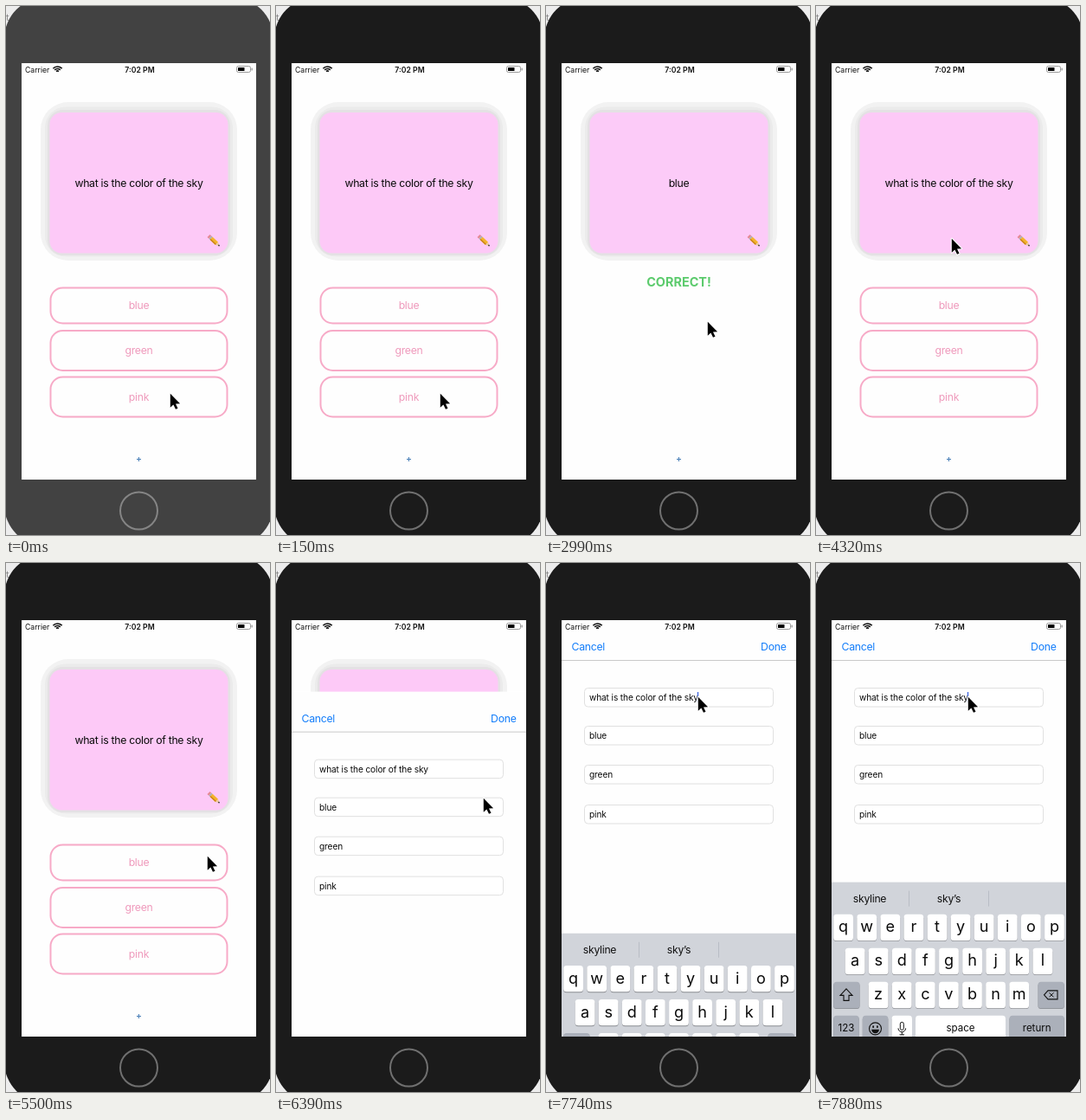
An HTML page with a canvas for the animation above (8 s loop, 305 by 611 pixels).

```html
<!DOCTYPE html>
<html lang="en">
<head>
<meta charset="utf-8">
<title>Flashcards</title>
<style>
html, body { margin: 0; width: 100%; height: 100%; overflow: hidden; background: #eee; }
canvas { display: block; width: 305px; height: 611px; }
</style>
</head>
<body>
<canvas id="stage"></canvas>
<script>
const W = 305, H = 611, LOOP = 8000;
const SCREEN = { x: 18, y: 66, w: 271, h: 481 };
const PT = SCREEN.w / 375;
const BLUE = '#137dfa', PINK = '#ef9abc';
const QUESTION = 'what is the color of the sky';

const canvas = document.getElementById('stage');
const ctx = canvas.getContext('2d');
const dpr = window.devicePixelRatio || 1;
canvas.width = W * dpr;
canvas.height = H * dpr;

// Pointer stops: time, x, y
const POINTER = [
  [0, 189, 447], [600, 189, 436], [750, 189, 415], [900, 189, 402],
  [1650, 188, 388], [1800, 186, 372], [1950, 186, 367],
  [2990, 186, 364], [3140, 183, 355], [3290, 182, 350],
  [3590, 175, 318], [3740, 164, 280], [3890, 157, 260],
  [4320, 156, 268], [4470, 173, 316],
  [4760, 170, 390], [4910, 163, 475], [5060, 159, 519], [5200, 167, 490],
  [5350, 203, 405], [5500, 232, 338], [5650, 242, 293], [5800, 244, 277],
  [5950, 239, 271], [6690, 212, 222], [6840, 199, 201],
  [7140, 184, 172], [7290, 175, 154]
];

const stepFrom = (t, start, step) => start + Math.floor((t - start) / step) * step;

// Remaining fraction of a critically damped slide
function spring(ms) {
  const a = Math.max(0, ms) * 0.01826;
  return (1 + a) * Math.exp(-a);
}

function box(x, y, w, h, r, fill, stroke, line = 1) {
  ctx.beginPath();
  ctx.roundRect(x, y, w, h, r);
  if (fill) { ctx.fillStyle = fill; ctx.fill(); }
  if (stroke) { ctx.strokeStyle = stroke; ctx.lineWidth = line; ctx.stroke(); }
}

function path(points, color, width = 1, closed = false) {
  ctx.beginPath();
  points.forEach(([x, y]) => ctx.lineTo(x, y));
  if (closed) ctx.closePath();
  ctx.strokeStyle = color;
  ctx.lineWidth = width;
  ctx.stroke();
}

function text(str, x, y, pt, color, { align = 'center', weight = 400, track = 0 } = {}) {
  ctx.font = `${weight} ${pt * PT}px Inter, Roboto, sans-serif`;
  ctx.letterSpacing = `${track * PT}px`;
  ctx.textAlign = align;
  ctx.fillStyle = color;
  ctx.fillText(str, x, y);
}

const body = (str, x, y, color, align) => text(str, x, y, 17, color, { align, track: -0.41 });

function drawDevice(active) {
  ctx.fillStyle = '#ededed';
  ctx.fillRect(0, 0, W, H);
  text('t', 0, 17, 15, '#888', { align: 'left' });
  const shell = active ? '#1b1b1b' : '#424242';
  box(-2, -10, 311, 634, 48, shell);
  ctx.beginPath();
  ctx.arc(153.5, 583, 21.5, 0, Math.PI * 2);
  ctx.strokeStyle = active ? '#707070' : '#858585';
  ctx.lineWidth = 2;
  ctx.stroke();
}

function drawStatusBar() {
  text('Carrier', 22, 76.5, 12, '#111', { align: 'left' });
  text('7:02 PM', 154.5, 76.5, 12, '#111', { weight: 600 });
  ctx.strokeStyle = '#111';
  ctx.lineWidth = 1.6;
  for (const r of [7, 4.5, 2]) {
    ctx.beginPath();
    ctx.arc(59.5, 77, r, -Math.PI * 0.76, -Math.PI * 0.24);
    ctx.stroke();
  }
  box(266.5, 69.5, 16, 7, 2, null, '#999');
  box(268, 71, 7.5, 4, 0.5, '#000');
  box(283.5, 71.5, 1.3, 3, 0.6, '#999');
}

function drawPencil() {
  ctx.save();
  ctx.translate(234, 265.5);
  ctx.rotate(Math.PI / 4.2);
  const parts = [[0, 2.5, '#e58a94'], [2.5, 1.8, '#a9b0b4'], [4.3, 8.7, '#f3b32c']];
  for (const [x, w, color] of parts) {
    ctx.fillStyle = color;
    ctx.fillRect(x, -2.2, w, 4.4);
  }
  ctx.fillStyle = '#c98318';
  ctx.fillRect(4.3, 0.8, 8.7, 1.4);
  ctx.fillStyle = '#ecc99a';
  ctx.beginPath();
  ctx.moveTo(13, -2.2);
  ctx.lineTo(17, 0);
  ctx.lineTo(13, 2.2);
  ctx.fill();
  ctx.fillStyle = '#333';
  ctx.fillRect(15.6, -0.7, 1.5, 1.4);
  ctx.restore();
}

function drawButton(label, y, h) {
  box(51.5, y, 204, h, 14, null, '#f7aac7', 2);
  body(label, 153.5, y + h / 2 + 4.4, PINK);
}

function drawCard(t) {
  const flipped = t >= 2090 && t < 4030;
  const reset = t >= 4030;
  box(40, 111, 227, 183, 32, '#f2f2f2');
  box(45, 116.5, 217, 173, 24, '#ebebeb');
  box(48, 120, 211, 168, 18, '#e4e1e4');
  box(50.5, 123, 206, 162.5, 14, flipped ? '#fccbf8' : '#fdc9f7');
  body(flipped ? 'blue' : QUESTION, 153.5, 208.7, '#0a0a0a');
  drawPencil();
  if (flipped) text('CORRECT!', 153.5, 324.3, 20, '#5ccb6d', { weight: 700 });
  else drawButton('blue', 325.5, 41);
  if (t < 1200 || reset) drawButton('green', 375, 46);
  if (t < 300 || reset) drawButton('pink', 428.5, 46);
  path([[151, 523.5], [156, 523.5]], '#4a80b8');
  path([[153.5, 521], [153.5, 526]], '#4a80b8');
}

function drawEditor(t) {
  ctx.save();
  ctx.translate(0, SCREEN.h * spring(stepFrom(t, 6240, 150) - 6215));
  ctx.fillStyle = '#fefefe';
  ctx.fillRect(SCREEN.x, SCREEN.y, SCREEN.w, SCREEN.h);
  body('Cancel', 29.5, 101, BLUE, 'left');
  body('Done', 277.5, 101, BLUE, 'right');
  path([[18, 112.5], [289, 112.5]], '#c9c9c9');
  [[QUESTION, 144.5], ['blue', 188.5], ['green', 233.5], ['pink', 279.5]].forEach(([label, y]) => {
    box(44.5, y, 218, 21.5, 4, '#fff', '#e0e0e0');
    text(label, 50, y + 14.4, 14, '#0a0a0a', { align: 'left', track: -0.15 });
  });
  if (t >= 7740) {
    ctx.fillStyle = '#4469e0';
    ctx.fillRect(174.8, 149, 1.4, 12.5);
  }
  ctx.restore();
}

function key(x, y, w, label, special = false, pt = 25) {
  box(x, y + 0.8, w, 30.4, 3.5, '#898b90');
  box(x, y, w, 30.4, 3.5, special ? '#abb0ba' : '#fff');
  if (label) text(label, x + w / 2, y + (pt > 20 ? 20.6 : 18.6), pt, '#0a0a0a');
}

function drawKeyIcons(y3, y4) {
  const ink = '#111';
  const s = y3 + 8;
  path([[35, s], [42, s + 7.5], [38, s + 7.5], [38, s + 13.5], [32, s + 13.5], [32, s + 7.5], [28, s + 7.5]], ink, 1.1, true);
  const b = y3 + 10;
  path([[263.5, b + 5], [268, b], [279, b], [279, b + 10], [268, b + 10]], ink, 1.1, true);
  path([[269.5, b + 2.5], [274.5, b + 7.5]], ink);
  path([[274.5, b + 2.5], [269.5, b + 7.5]], ink);

  const m = y4 + 15;
  ctx.strokeStyle = ink;
  ctx.lineWidth = 1.1;
  ctx.beginPath();
  ctx.arc(68.5, m, 7, 0, Math.PI * 2);
  ctx.stroke();
  ctx.fillStyle = ink;
  ctx.beginPath();
  ctx.arc(68.5, m + 1, 4.4, 0, Math.PI);
  ctx.fill();
  ctx.fillRect(65.3, m - 3.4, 1.7, 2.4);
  ctx.fillRect(70, m - 3.4, 1.7, 2.4);

  box(97.3, m - 7.5, 4, 9, 2, null, ink);
  ctx.beginPath();
  ctx.arc(99.3, m - 0.5, 4.3, 0, Math.PI);
  ctx.stroke();
  path([[99.3, m + 4], [99.3, m + 7]], ink);
  path([[96.5, m + 7], [102, m + 7]], ink);
}

function drawKeyboard(t) {
  const held = t < 7880 ? 7740 : 7880;
  const top = 359 + 188 * spring(held - 7622);
  ctx.fillStyle = '#d1d4da';
  ctx.fillRect(SCREEN.x, top, SCREEN.w, 190);
  body('skyline', 62, top + 23, '#111');
  body('sky’s', 153.5, top + 23, '#111');
  for (const x of [107.5, 199.5]) path([[x, top + 10], [x, top + 28]], '#b9bdc5');

  const rowY = i => top + 37.2 + i * 39;
  const pitch = 37.5 * PT, keyW = 31.5 * PT;
  [['qwertyuiop', 20.2], ['asdfghjkl', 33.7], ['zxcvbnm', 60.7]].forEach(([letters, x], row) => {
    [...letters].forEach((c, i) => key(x + i * pitch, rowY(row), keyW, c));
  });
  key(20.2, rowY(2), 30.3, '', true);
  key(256.5, rowY(2), 30.3, '', true);
  key(20.2, rowY(3), 29.5, '123', true, 16);
  key(53.8, rowY(3), 29.5, '', true);
  key(87.5, rowY(3), 23.5, '');
  key(115, rowY(3), 104, 'space', false, 16);
  key(223.5, rowY(3), 63.3, 'return', true, 16);
  drawKeyIcons(rowY(2), rowY(3));
}

function drawPointer(t) {
  const [, x, y] = POINTER.findLast(p => p[0] <= t);
  ctx.save();
  ctx.translate(x + 0.8, y + 0.8);
  ctx.lineJoin = 'round';
  const arrow = [[0, 0], [0, 16], [3.6, 12.6], [6.2, 18], [8.7, 16.9], [6.2, 11.6], [11.3, 11.4]];
  path(arrow, '#fff', 2.2, true);
  ctx.fillStyle = '#000';
  ctx.fill();
  ctx.restore();
}

function render(t) {
  ctx.setTransform(dpr, 0, 0, dpr, 0, 0);
  drawDevice(t >= 150);
  ctx.save();
  ctx.beginPath();
  ctx.rect(SCREEN.x, SCREEN.y, SCREEN.w, SCREEN.h);
  ctx.fillStyle = '#fefefe';
  ctx.fill();
  ctx.clip();
  drawCard(t);
  if (t >= 6240) drawEditor(t);
  if (t >= 7740) drawKeyboard(t);
  drawStatusBar();
  ctx.restore();
  drawPointer(t);
}

const start = performance.now();
function tick() {
  render((performance.now() - start) % LOOP);
  requestAnimationFrame(tick);
}
tick();
</script>
</body>
</html>
```
